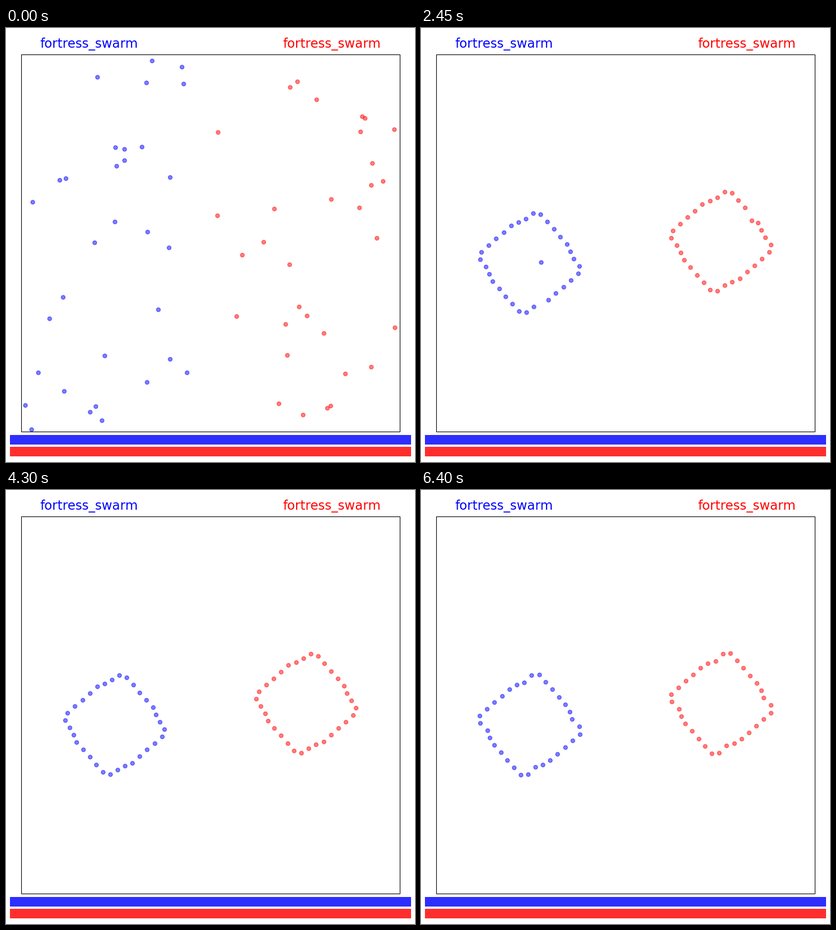
Write a matplotlib script that moves like this. It is 726x771 px and loops after 6450 ms.

```python
import numpy as np
import matplotlib.pyplot as plt
from matplotlib.animation import FuncAnimation
from matplotlib.patches import Rectangle

W, H, DPI = 726, 771, 100
FRAMES, INTERVAL = 129, 50
BOTS = 32
SPEED = 6.715                      # largest move per axis and step
SPIN = 0.1 * BOTS / (2 * np.pi)    # ring slots passed per step

rng = np.random.default_rng(5)


def wave(s):
    """Swing of the ring along one axis: quick turn, short stall, steady run."""
    half = BOTS // 2
    sign = np.where(s % BOTS < half, 1, -1)
    return sign * np.interp(s % half, [0, 1, 2, 3.5, 8, 16], [89, 88, 75, 69, 16.5, -89])


def ring(step, center):
    s = np.arange(BOTS) + (step - FRAMES + 1) * SPIN
    return np.column_stack([wave(s), -wave(s - BOTS / 4)]) + center


def march(left, right, center):
    """Scatter the bots over their half, then let each chase its turning slot."""
    pos = rng.uniform((left, 57), (right, 714), (BOTS, 2))
    track = [pos]
    for step in range(1, FRAMES):
        pos = pos + np.clip(ring(step, center) - pos, -SPEED, SPEED)
        track.append(pos)
    return track


fig = plt.figure(figsize=(W / DPI, H / DPI), dpi=DPI, facecolor="white")
ax = fig.add_axes([0, 0, 1, 1])
ax.set_xlim(0, W)
ax.set_ylim(H, 0)
ax.axis("off")

arena = Rectangle((27, 47), 672, 670, fill=False, ec="black", lw=0.8, zorder=3)
ax.add_patch(arena)


def add_team(color, left, right, center, name_x, bar_y):
    ax.text(name_x, 35, "fortress_swarm", color=color, fontsize=16.4,
            family="DejaVu Sans", ha="center", va="baseline")
    ax.add_patch(Rectangle((7, bar_y), 712, 17, fc=color, ec="none", alpha=0.82))
    dots, = ax.plot([], [], "o", color=color, ms=5, alpha=0.5, zorder=2)
    dots.set_clip_path(arena)
    return dots, march(left, right, center)


teams = [
    add_team("blue", 29, 354, (193, 417), 147, 723),
    add_team("red", 375, 693, (532.5, 379), 578, 744),
]


def draw(step):
    for dots, track in teams:
        dots.set_data(*track[step].T)
    return [dots for dots, _ in teams]


anim = FuncAnimation(fig, draw, frames=FRAMES, interval=INTERVAL,
                     repeat=True, repeat_delay=0)
plt.show()
```
